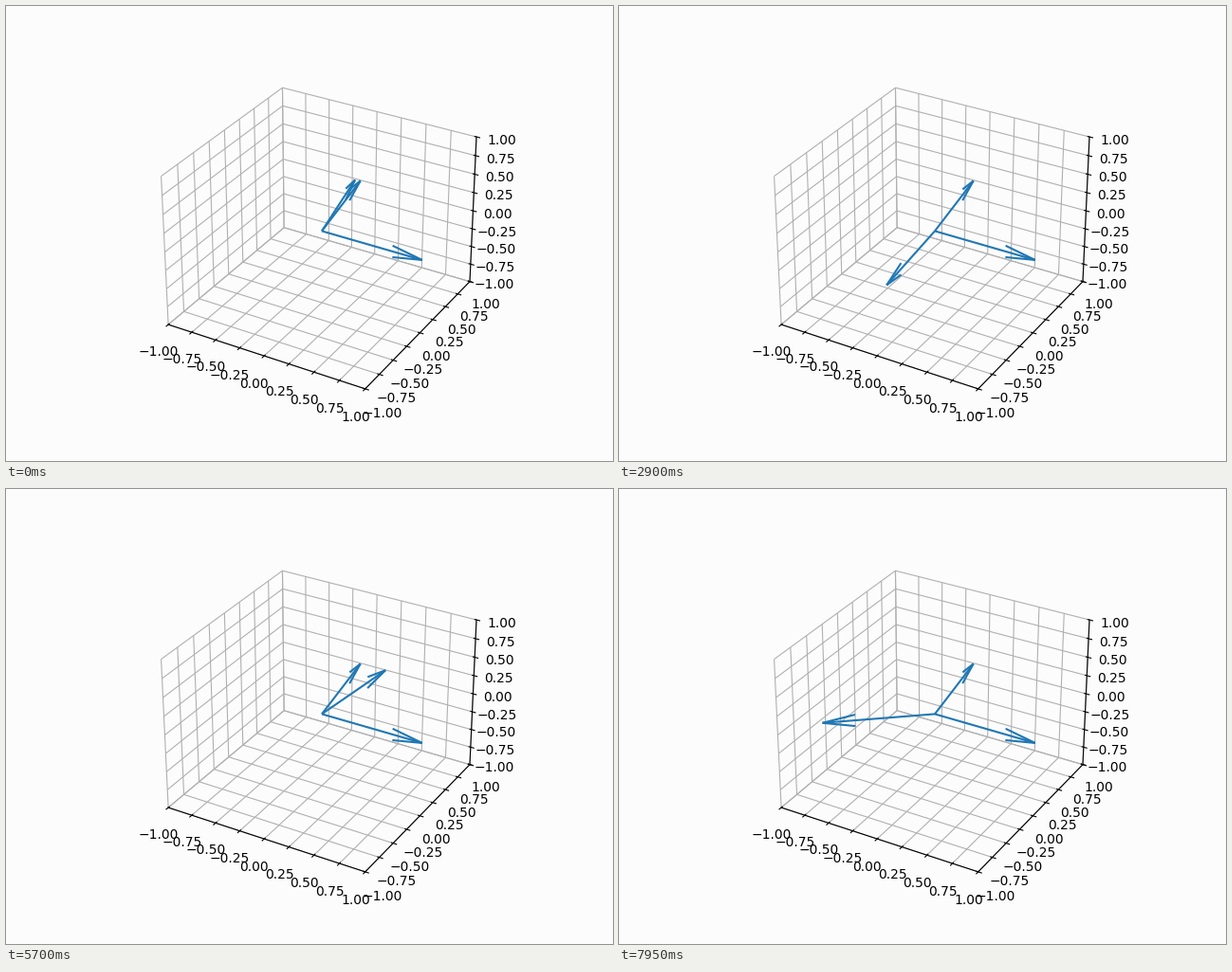
A matplotlib script for the animation above (8000 ms loop, 640 px wide and 480 px high).

```python
import numpy as np
import matplotlib.pyplot as plt
from matplotlib.animation import FuncAnimation

FRAMES, INTERVAL = 160, 50
START, STEP = 102, 3  # degrees
PAPER = "#fcfcfc"

fig = plt.figure(figsize=(6.4, 4.8), dpi=100, facecolor=PAPER)
ax = fig.add_subplot(projection="3d", facecolor=PAPER)
ax.set(xlim=(-1, 1), ylim=(-1, 1), zlim=(-1, 1))
for axis in (ax.xaxis, ax.yaxis, ax.zaxis):
    axis.set_pane_color((1, 1, 1, 0))


def arrow(degrees):
    """Unit arrow from the centre, lying in the horizontal plane."""
    a = np.radians(degrees)
    return ax.quiver(0, 0, 0, np.cos(a), np.sin(a), 0, color="C0")


arrow(0)
arrow(START - STEP)
hand = arrow(START)


def update(i):
    global hand
    hand.remove()
    hand = arrow(START + STEP * i)
    return [hand]


def init():
    return update(0)


anim = FuncAnimation(fig, update, frames=FRAMES, init_func=init,
                     interval=INTERVAL, repeat=True, repeat_delay=0)
plt.show()
```
